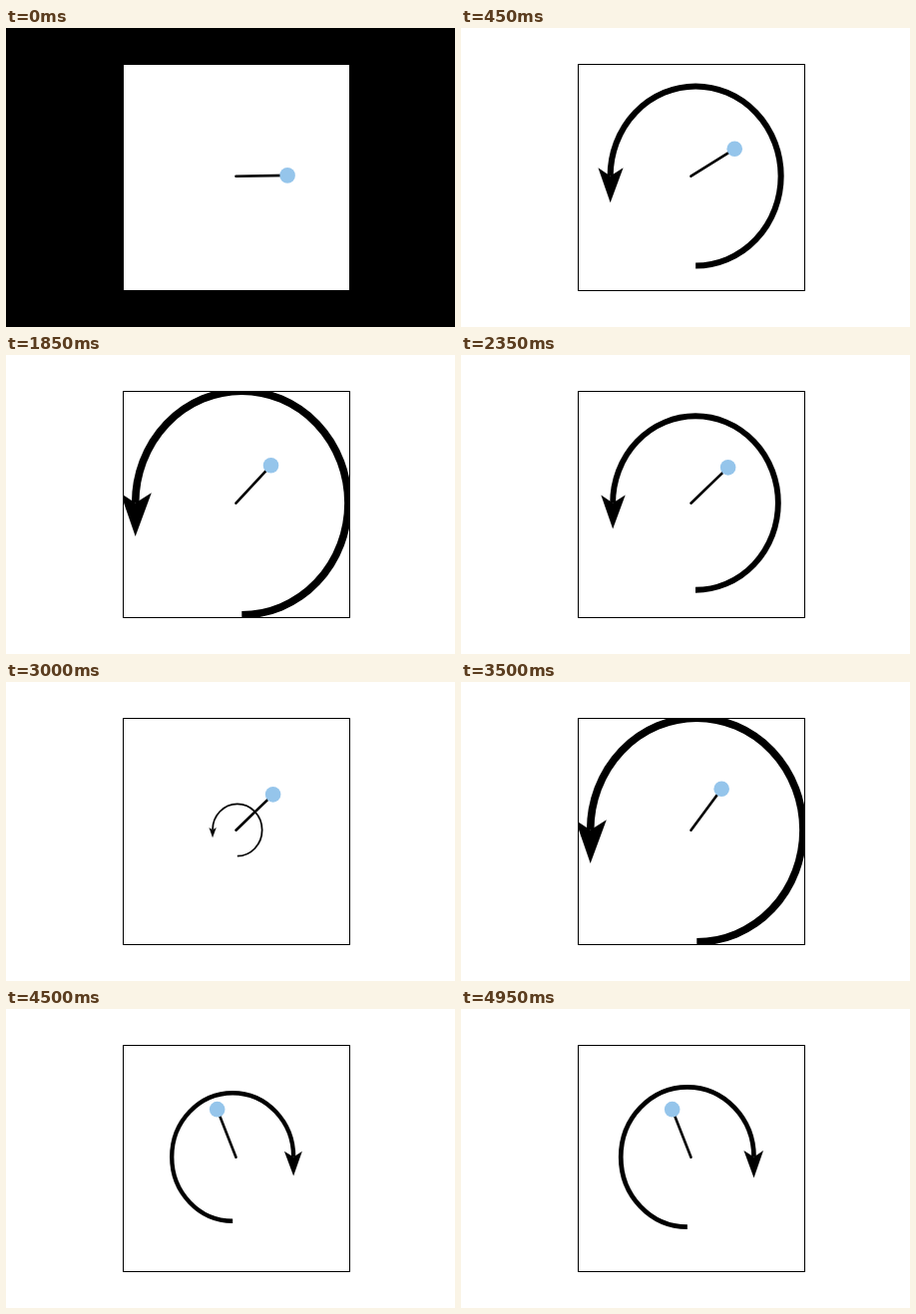
Recreate the animation shown at these times as an HTML page with a canvas. Size 450x300 px, loop 5 s.

```html
<!DOCTYPE html>
<html>
<head>
<meta charset="utf-8">
<style>
  html, body { margin: 0; width: 100%; height: 100%; overflow: hidden; background: #fff; }
  canvas { display: block; }
</style>
</head>
<body>
<canvas id="stage" width="450" height="300"></canvas>
<script>
const ctx = document.getElementById('stage').getContext('2d');
const STEP = 50, STEPS = 100;
const PIVOT = { x: 230.5, y: 148.7 }, ROD = 51.6;
const MAX_TORQUE = 9, ARROW_SCALE = 12.89;

// Swing of the control torque around the value that balances gravity.
const phases = [
  { until: 45, amp: 12.5, rate: 2.195, at: 9, phase: 1.33 },
  { until: 67, amp: 4.5, rate: 2.0253, at: 47, phase: 0.715 },
  { until: STEPS, amp: 7.5, rate: 2.0863, at: 80, phase: 2.24 },
];

function ease(x) {
  x = Math.min(1, Math.max(0, x));
  return x * x * (3 - 2 * x);
}

// Angle above the horizontal, in radians.
function angleAt(n) {
  const degrees = 0.9 + 48.1 * ease(n / 15) - 5 * ease((n - 33) / 10) + 67.4 * ease((n - 66) / 16.9);
  return degrees * Math.PI / 180;
}

function torqueAt(n) {
  if (n === 0) return 0;
  const { amp, rate, at, phase } = phases.find(p => n < p.until);
  const torque = 5 * Math.cos(angleAt(n)) + amp * Math.cos(rate * (n - at) + phase);
  return Math.min(MAX_TORQUE, Math.max(-MAX_TORQUE, torque));
}

function drawPendulum(angle) {
  const x = PIVOT.x + ROD * Math.cos(angle);
  const y = PIVOT.y - ROD * Math.sin(angle);
  ctx.lineWidth = 2.6;
  ctx.lineCap = 'round';
  ctx.beginPath();
  ctx.moveTo(PIVOT.x, PIVOT.y);
  ctx.lineTo(x, y);
  ctx.stroke();
  ctx.fillStyle = '#95c5eb';
  ctx.beginPath();
  ctx.arc(x, y, 7.8, 0, 2 * Math.PI);
  ctx.fill();
}

// Positive torque turns counterclockwise; negative is the mirror image.
function drawArrow(torque) {
  const size = Math.abs(torque) * ARROW_SCALE;
  if (!size) return;
  ctx.save();
  ctx.beginPath();
  ctx.rect(118, 37, 226, 226);
  ctx.clip();
  ctx.translate(230.5, 148.5);
  ctx.scale(Math.sign(torque) * size, size);
  ctx.lineWidth = 0.065;
  ctx.lineCap = 'butt';
  ctx.beginPath();
  ctx.ellipse(0.05, 0, 0.919, 0.968, 0, Math.PI / 2, -Math.PI, true);
  ctx.stroke();
  ctx.fillStyle = '#000';
  ctx.beginPath();
  ctx.moveTo(-1, -0.088);
  ctx.lineTo(-0.869, 0);
  ctx.lineTo(-0.73, -0.088);
  ctx.lineTo(-0.869, 0.288);
  ctx.fill();
  ctx.restore();
}

function draw(now) {
  const n = Math.floor(now / STEP) % STEPS;
  ctx.fillStyle = n ? '#fff' : '#000';
  ctx.fillRect(0, 0, 450, 300);
  ctx.fillStyle = '#000';
  ctx.fillRect(117, 36, 228, 228);
  ctx.fillStyle = '#fff';
  ctx.fillRect(118, 37, 226, 226);
  drawPendulum(angleAt(n));
  drawArrow(torqueAt(n));
}

const start = performance.now();
function tick() {
  draw(performance.now() - start);
  requestAnimationFrame(tick);
}
tick();
</script>
</body>
</html>
```
